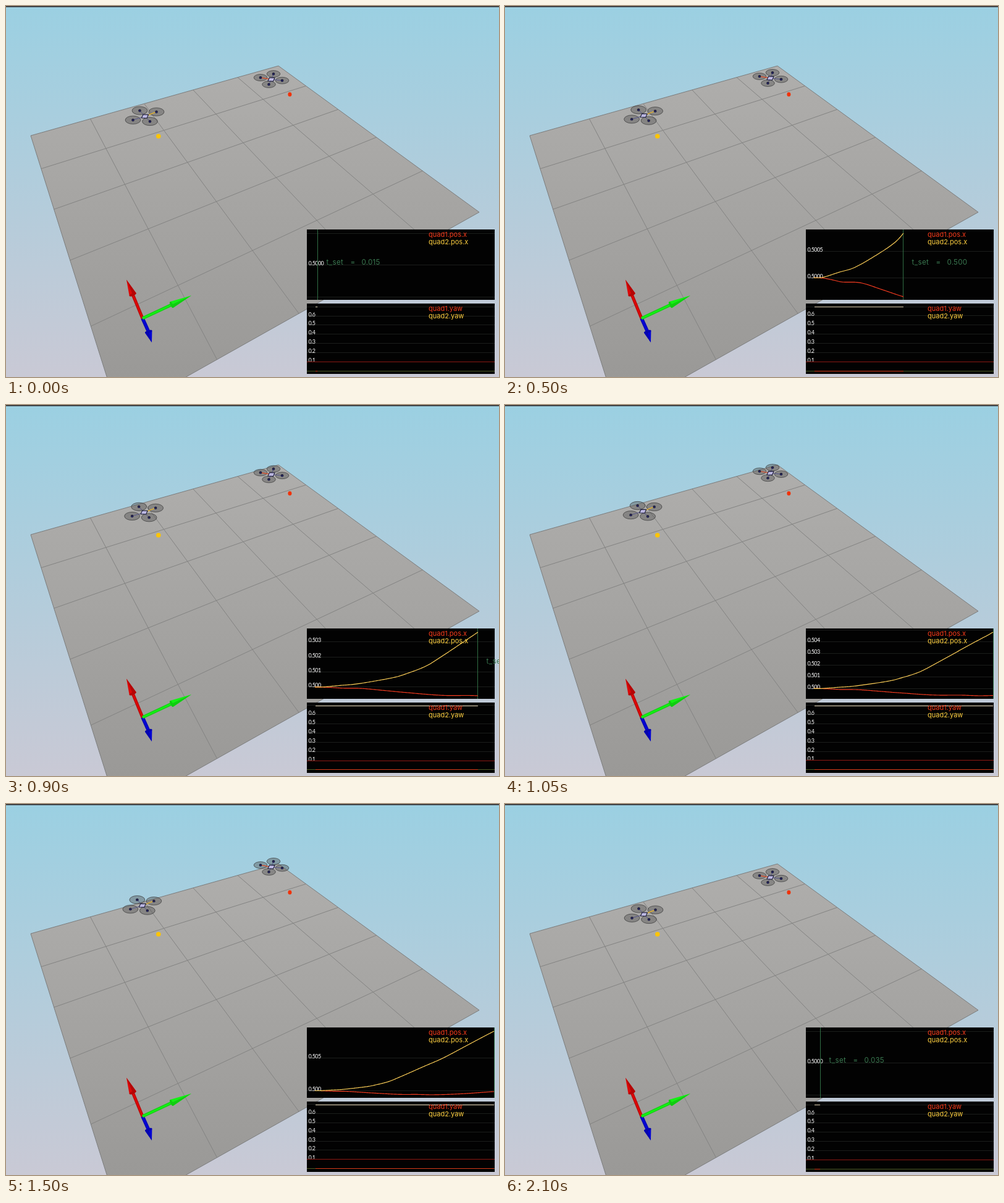
Animation of 798 by 601 pixels, one loop 2.15 s. Source, as an HTML page with a canvas:

```html
<!DOCTYPE html>
<html lang="en">
<head>
<meta charset="utf-8">
<title>Quadrotor simulation</title>
<style>
  html, body { margin: 0; width: 100%; height: 100%; overflow: hidden; }
  canvas { display: block; }
</style>
</head>
<body>
<canvas id="view" width="798" height="601"></canvas>
<script>
const W = 798, H = 601, LOOP = 2150, STEP = 50;
const ctx = document.getElementById('view').getContext('2d');
const RED = '#f83c1c', YELLOW = '#ffd040';
const LEGEND = '400 11px Inter, sans-serif';
const AXIS = '400 9px Lato, sans-serif';
const CLOCK = '400 11.6px Inter, sans-serif';

// position offsets in 1e-4, as [time, value]
const POS1 = [[0, 0], [.05, -.05], [.1, -.35], [.155, -.76], [.26, -.93], [.38, -2.2], [.5, -3.55], [.71, -5.5],
  [.87, -5.6], [1, -6.1], [1.24, -4.6], [1.5, -1.4], [1.75, 1.1], [2.1, 3.5]];
const POS2 = [[0, 0], [.05, .1], [.14, 1.05], [.224, 1.9], [.345, 4.2], [.45, 6.6], [.5, 8.4], [.62, 13.9],
  [.71, 20.5], [.8, 27.6], [.93, 38], [1.05, 47.3], [1.13, 54.5], [1.29, 70], [1.5, 90], [1.75, 112.5], [2.1, 143]];

function smooth(pts, t) {
  const n = pts.length - 1;
  let i = 0;
  while (i < n - 1 && t > pts[i + 1][0]) i++;
  const slope = k => {
    const a = pts[Math.max(k - 1, 0)], b = pts[Math.min(k + 1, n)];
    return (b[1] - a[1]) / (b[0] - a[0]);
  };
  const [t0, v0] = pts[i], [t1, v1] = pts[i + 1];
  const d = t1 - t0, s = (t - t0) / d, s2 = s * s, s3 = s2 * s;
  return v0 * (2 * s3 - 3 * s2 + 1) + v1 * (3 * s2 - 2 * s3)
    + d * (slope(i) * (s3 - 2 * s2 + s) + slope(i + 1) * (s3 - s2));
}

function simTime(ms) {
  if (ms >= 2100) return .035;
  const s = ms / 1000;
  const t = s < .5 ? .015 + .97 * s : Math.min(.5 + 1.05 * (s - .5), s + .01);
  return Math.round(t * 200) / 200;
}

const snap = v => Math.floor(v) + .5;

function path(pts, close) {
  ctx.beginPath();
  pts.forEach(([x, y]) => ctx.lineTo(x, y));
  if (close) ctx.closePath();
}

function line(pts, color, width = 1) {
  path(pts);
  ctx.strokeStyle = color;
  ctx.lineWidth = width;
  ctx.stroke();
}

const hline = (x0, x1, y, color) => line([[x0, y], [x1, y]], color);

function poly(pts, color) {
  path(pts, true);
  ctx.fillStyle = color;
  ctx.fill();
}

function oval(x, y, rx, ry, fill, edge) {
  ctx.beginPath();
  ctx.ellipse(x, y, rx, ry, 0, 0, 7);
  ctx.fillStyle = fill;
  ctx.fill();
  if (edge) {
    ctx.strokeStyle = edge;
    ctx.lineWidth = 1;
    ctx.stroke();
  }
}

function text(s, x, y, color, font, gap = 0) {
  ctx.font = font;
  ctx.letterSpacing = gap + 'px';
  ctx.fillStyle = color;
  ctx.fillText(s, x, y);
}

function fade(y0, y1, c0, c1) {
  const g = ctx.createLinearGradient(0, y0, 0, y1);
  g.addColorStop(0, c0);
  g.addColorStop(1, c1);
  return g;
}

// perspective of the unit square onto the floor
function floorPoint(u, v) {
  const w = 1 + .2681 * u - .4621 * v;
  return [(40 + 519.2 * u + 58.2 * v) / w, (210 - 87 * u + 146.2 * v) / w];
}

function drawWorld() {
  ctx.fillStyle = fade(0, H, '#9bd0e2', '#c9c9d5');
  ctx.fillRect(0, 0, W, H);
  ctx.fillStyle = '#404346';
  ctx.fillRect(0, 0, W, 2);

  poly([[0, 0], [1, 0], [1, 1], [0, 1]].map(p => floorPoint(...p)), fade(97, H, '#afaeac', '#9a9997'));
  for (let i = 0; i <= 5; i++) {
    const k = i / 5, color = i % 5 ? '#838382' : '#7b7c7c';
    line([floorPoint(k, 0), floorPoint(k, 1)], color);
    line([floorPoint(0, k), floorPoint(1, k)], color);
  }
}

function arrow(base, tip, half, width, light, dark) {
  const o = [221, 506];
  const dx = tip[0] - base[0], dy = tip[1] - base[1], d = Math.hypot(dx, dy);
  const nx = -dy / d * half, ny = dx / d * half;
  line([o, base], dark, width);
  line([o, base], light, width * .6);
  const a = [base[0] + nx, base[1] + ny], b = [base[0] - nx, base[1] - ny];
  poly([a, tip, b], light);
  poly([a, tip, base], dark);
  ctx.save();
  ctx.translate(...base);
  ctx.rotate(Math.atan2(dy, dx));
  oval(0, 0, half * .35, half, dark);
  ctx.restore();
}

function drawAxes() {
  arrow([230.7, 527.5], [236, 545], 6, 5.5, '#0404d4', '#0404b0');
  arrow([205.2, 467.5], [195, 443.5], 6, 5, '#dc0808', '#b40606');
  arrow([268, 484], [300, 469], 5.5, 5, '#14f014', '#10cc10');
}

// the front rotor comes last in the list
function drone(x, y, rotors, rx, ry, front) {
  ctx.save();
  ctx.translate(x, y);
  rotors.forEach(([px, py]) => oval(px, py, rx, ry, 'rgba(84,84,84,.43)', 'rgba(56,56,56,.7)'));
  rotors.forEach(([px, py], i) => {
    line([[0, 0], [px, py]], i === 3 ? front : '#50508c', i === 3 ? 1.4 : .9);
    oval(px, py, 2.3, 2.2, '#20203a');
    oval(px, py + .5, 1, .9, '#28287c');
  });
  const box = [[-3, -3], [5.5, -2.6], [3, 3], [-5.5, 2.6]];
  poly(box, '#bcb8e2');
  path(box, true);
  ctx.strokeStyle = '#1c1c38';
  ctx.lineWidth = 1.1;
  ctx.stroke();
  ctx.restore();
}

function drawDrones(t) {
  const up1 = t * t * (8.3 - .55 * t), up2 = t * t * (4.7 + 1.05 * t);
  oval(246.8, 210.9, 3.8, 3.7, '#fcc404');
  oval(459.4, 143.2, 3, 3.4, '#f03208');
  drone(429.5, 119 - up1, [[3.5, -9], [17.5, 1.7], [-4, 8], [-17.5, -3]], 10.8, 5.4, '#d05030');
  drone(225 - .29 * up2, 178.7 - up2, [[-8.5, -9.2], [-19.5, 6], [8, 8.3], [18.5, -7.2]], 12.4, 6.6, '#e0b030');
}

function panel(y) {
  ctx.fillStyle = '#020202';
  ctx.fillRect(487, y, 304, 114);
}

function gridLine(y, label) {
  hline(487, 791, y, '#1b1d1b');
  if (label) text(label, 489.5, y + .4, '#fff', AXIS, -.6);
}

function legend(y, name) {
  text('quad1.' + name, 684, y, RED, LEGEND);
  text('quad2.' + name, 684, y + 12, YELLOW, LEGEND);
}

function drawPosition(t, xAt) {
  panel(362);
  const count = Math.max(2, Math.ceil(t * 150));
  const curves = [POS1, POS2].map(pts => {
    const out = [];
    for (let i = 0; i <= count; i++) out.push([t * i / count, smooth(pts, t * i / count)]);
    return out;
  });
  const values = curves.flat().map(p => p[1]);
  let lo = Math.min(...values), hi = Math.max(...values);
  const flat = hi - lo < .5;
  if (flat) { lo = -.5; hi = .5; }
  const yAt = v => 471 - (v - lo) / (hi - lo) * 103;

  // smallest step of 1 or 5 times a power of ten that is not too dense
  let step = .1;
  for (let k = 0; (hi - lo) / step > 8; k++) step *= k % 2 ? 2 : 5;
  const digits = step < 9.9 ? 4 : 3;
  for (let i = Math.floor(lo / step) - 1; i <= hi / step + 1; i++) {
    const y = snap(yAt(i * step));
    if (y < 362 || y > 476) continue;
    gridLine(y, y > 368.6 && y < 470.5 && (.5 + i * step / 1e4).toFixed(digits));
  }

  const x = snap(xAt(t));
  line([[x, 362], [x, 476]], '#306e44');
  if (!flat) {
    curves.forEach((c, i) => line(c.map(([s, v]) => [xAt(s), yAt(v)]), i ? '#ffd058' : '#f83c20', 1.15));
  }
  legend(374.3, 'pos.x');

  const green = '#3a7850';
  text('t_set', x + 14, 419, green, CLOCK, .4);
  text('=', x + 53, 419, green, CLOCK);
  text(t.toFixed(3), x + 71, 419, green, CLOCK, .2);
}

function drawYaw(t, xAt) {
  panel(482);
  // the axis grows slightly as the first yaw drifts below zero
  const zero = 591.2 - .36 * t;
  const yAt = v => snap(zero - v * 148.5);
  for (let i = 1; i <= 7; i++) gridLine(yAt(i / 10), i < 7 && (i / 10).toFixed(1));
  hline(487, 791, yAt(.1), '#8c1812');
  hline(487, 791, yAt(0), '#4c5a24');
  const x = xAt(t);
  hline(501, x, yAt(0), '#d43a18');
  hline(501, x, 487.5, '#e8d8b8');
  legend(494.3, 'yaw');
}

function render(ms) {
  const t = simTime(Math.floor(ms / STEP) * STEP);
  const xAt = s => 499.9 + 290.1 * s / Math.max(1, t);
  drawWorld();
  drawAxes();
  drawDrones(t);
  drawPosition(t, xAt);
  drawYaw(t, xAt);
}

let start;
function tick(now) {
  if (start === undefined) start = now;
  render(Math.max(0, now - start) % LOOP);
  requestAnimationFrame(tick);
}
render(0);
requestAnimationFrame(tick);
</script>
</body>
</html>
```
